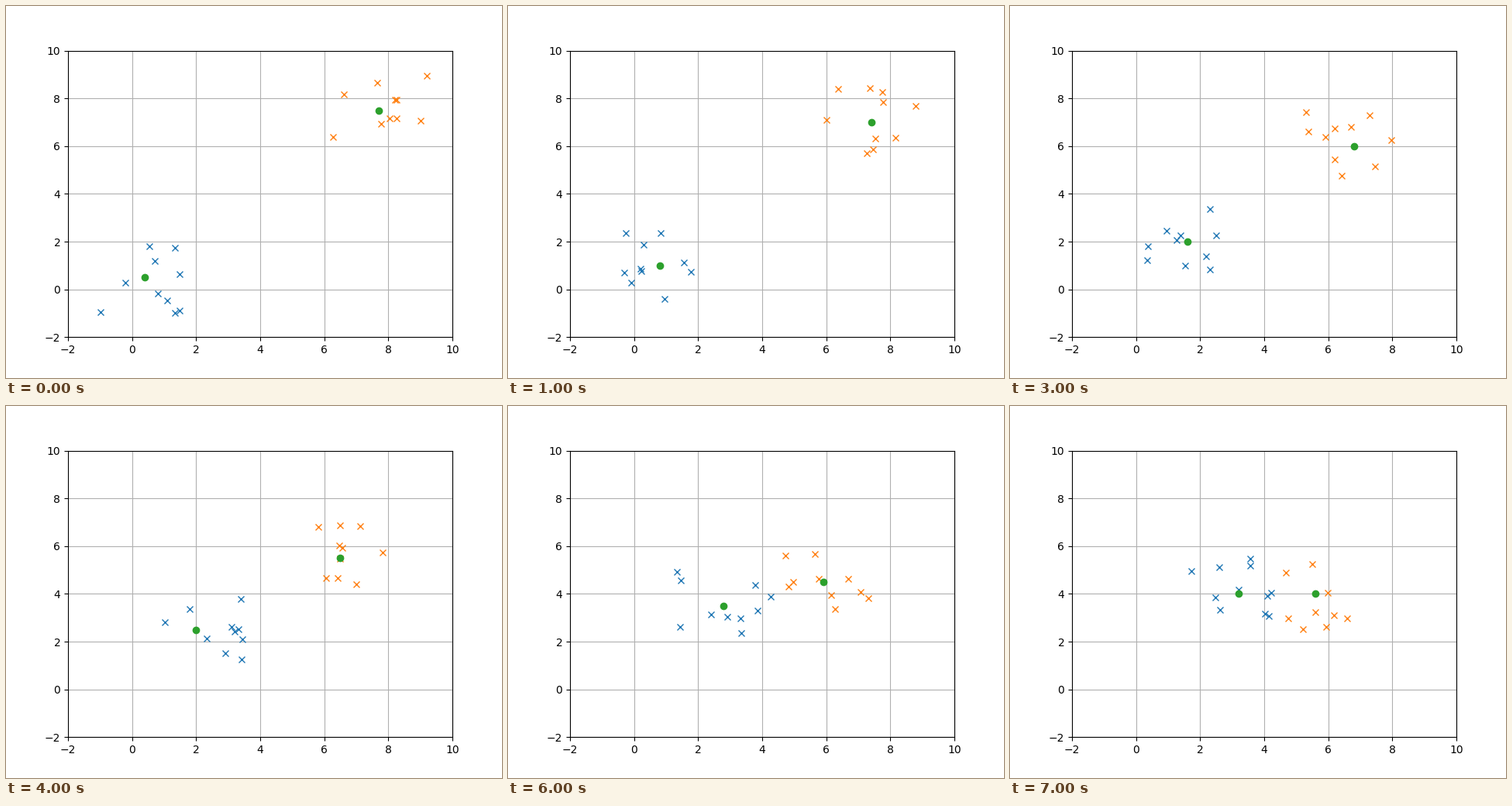
A matplotlib script for the animation above (8 s loop, 640 by 480 pixels).

```python
import numpy as np
import matplotlib.pyplot as plt
from matplotlib.animation import FuncAnimation

STEPS = 8
COUNT = 10     # points around each center
SPREAD = 1.5   # largest offset from a center, per axis
START = np.array([[0.4, 0.5], [7.7, 7.5]])
SHIFT = np.array([[0.4, 0.5], [-0.3, -0.5]])

fig, ax = plt.subplots(figsize=(6.4, 4.8), dpi=100)
ax.set_xlim(-2, 10)
ax.set_ylim(-2, 10)
ax.grid(True)

lower, = ax.plot([], [], 'x', color='tab:blue')
upper, = ax.plot([], [], 'x', color='tab:orange')
marks, = ax.plot([], [], 'o', color='tab:green')


def scatter(centers, seed):
    """Fresh random points around both centers."""
    rng = np.random.default_rng(seed)
    offsets = rng.uniform(-SPREAD, SPREAD, (2, COUNT, 2))
    return (centers[:, None] + offsets).reshape(-1, 2)


def nearest(points, centers):
    """Index of the closest center for each point."""
    gaps = np.linalg.norm(points[:, None] - centers, axis=2)
    return gaps.argmin(axis=1)


def update(step):
    centers = START + SHIFT * step
    points = scatter(centers, seed=step)
    label = nearest(points, centers)
    lower.set_data(*points[label == 0].T)
    upper.set_data(*points[label == 1].T)
    marks.set_data(*centers.T)
    return lower, upper, marks


anim = FuncAnimation(fig, update, frames=STEPS, interval=1000,
                     repeat=True, repeat_delay=0)
plt.show()
```
